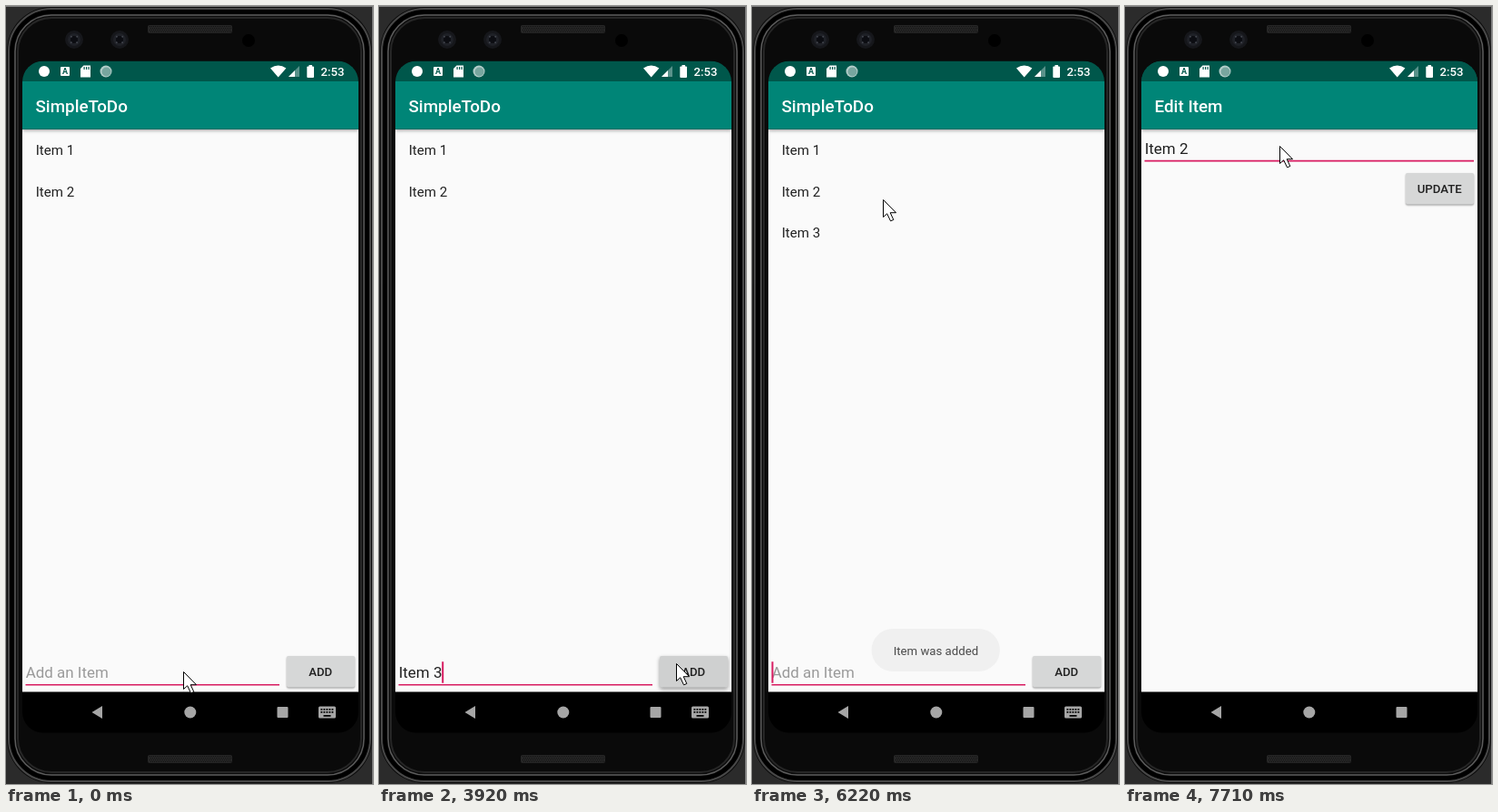
An HTML page with a canvas that plays this animation: 404 by 857 pixels, repeating every 7.99 s.

```html
<!DOCTYPE html>
<html lang="en">
<head>
<meta charset="utf-8">
<title>To-do app on a phone</title>
<style>
  html, body { margin: 0; width: 100%; height: 100%; overflow: hidden; background: #2b2b2b; }
  canvas { display: block; width: 404px; height: 857px; }
</style>
</head>
<body>
<canvas id="stage"></canvas>
<script>
const WIDTH = 404, HEIGHT = 857, LOOP = 7990;
const TEAL = '#008577', DARK_TEAL = '#00574b', PINK = '#d81b60', PAPER = '#fafafa', INK = '#212121';
const SCREEN = { x: 18, top: 60.5, width: 370, bar: 83.1, body: 135.7, nav: 755.4, bottom: 800.7 };

// Motion advances in steps, like a screen recording.
const STEP = 136, PHASE = 78;
const KEYSTROKES = [1040, 1470, 1620, 1920, 2510, 2790];
const ADDED = 4070, OPENED = 6890;
const FOCUS = [600, ...KEYSTROKES, ADDED, 7014];

// Pointer path: step, x, y, with straight moves between
const PATH = [
  [-1, 195, 733], [0, 200, 736], [22.7, 200, 736], [26, 327, 724], [31, 327, 724],
  [32, 350, 725], [34, 219, 676], [37, 114, 478], [44, 144, 213], [49, 144, 213],
  [50, 149, 213], [51, 149, 213], [54, 174, 141], [55, 174, 141], [56, 170, 154]
];

const canvas = document.getElementById('stage');
const ctx = canvas.getContext('2d');
const ratio = window.devicePixelRatio || 1;
canvas.width = WIDTH * ratio;
canvas.height = HEIGHT * ratio;
ctx.scale(ratio, ratio);

const clamp = v => Math.min(1, Math.max(0, v));

function pointerAt(step) {
  const next = PATH.findIndex(key => key[0] > step);
  if (next < 0) return PATH.at(-1).slice(1);
  const [from, x, y] = PATH[next - 1], [to, nextX, nextY] = PATH[next];
  const k = (step - from) / (to - from);
  return [x + (nextX - x) * k, y + (nextY - y) * k];
}

function stateAt(t) {
  const step = Math.floor((t - PHASE) / STEP);
  const s = PHASE + step * STEP;
  const lastFocus = FOCUS.findLast(time => time <= t);
  return {
    value: t < ADDED ? 'Item 3'.slice(0, KEYSTROKES.filter(time => time <= t).length) : '',
    items: t < ADDED ? 2 : 3,
    caret: lastFocus !== undefined && Math.max(0, s - lastFocus + 100) % 1000 < 500,
    ripple: { radius: Math.max(0, (s - 3733) * 0.6), tint: 0.03 * clamp((4290 - s) / 400) },
    toast: Math.min(clamp((s - 4360) / 340), clamp((6470 - s) / 310)),
    edit: clamp((s - 6780) / 246),
    offset: Math.round(9 * Math.exp((7014 - s) / 150)),
    keyboard: t < OPENED,
    pointer: pointerAt(step)
  };
}

function rect(x, y, w, h, fill, radius = 0) {
  ctx.fillStyle = fill;
  ctx.beginPath();
  ctx.roundRect(x, y, w, h, radius);
  ctx.fill();
}

function ring(inset, color, width) {
  ctx.strokeStyle = color;
  ctx.lineWidth = width;
  ctx.beginPath();
  ctx.roundRect(inset, inset, WIDTH - 2 * inset, HEIGHT - 2 * inset, 50 - inset);
  ctx.stroke();
}

function disc(x, y, r, fill) {
  ctx.fillStyle = fill;
  ctx.beginPath();
  ctx.arc(x, y, r, 0, Math.PI * 2);
  ctx.fill();
}

function shape(points, fill, stroke) {
  ctx.beginPath();
  points.forEach(p => ctx.lineTo(...p));
  ctx.closePath();
  ctx.fillStyle = fill;
  ctx.fill();
  if (!stroke) return;
  ctx.strokeStyle = stroke;
  ctx.lineWidth = 1;
  ctx.stroke();
}

function text(string, x, y, size, color = INK, weight = 400, align = 'left') {
  ctx.font = `${weight} ${size}px Roboto, sans-serif`;
  ctx.fillStyle = color;
  ctx.textAlign = align;
  ctx.fillText(string, x, y);
}

function shadowed(blur, dy, draw) {
  ctx.save();
  ctx.shadowColor = 'rgba(0,0,0,.4)';
  ctx.shadowBlur = blur * ratio;
  ctx.shadowOffsetY = dy * ratio;
  draw();
  ctx.restore();
}

function speaker(y) {
  rect(156, y, 93, 9, '#262626', 2);
  for (let row = 0; row < 4; row++)
    for (let x = 158 + row % 2; x < 248; x += 2) rect(x, y + 1 + row * 2, 1, 1, '#111');
}

function camera(x) {
  disc(x, 37, 10, '#16171b');
  disc(x, 37, 7, '#1f2127');
  disc(x, 37, 4, '#0c0d12');
  for (let a = 0.8; a < 6; a += Math.PI / 2)
    disc(x + 4.5 * Math.cos(a), 37 + 4.5 * Math.sin(a), 1, '#42454d');
}

function drawPhone() {
  rect(0, 0, WIDTH, HEIGHT, '#2b2b2b');
  rect(1, 1, WIDTH - 2, HEIGHT - 2, '#0a0a0a', 49);
  ring(3, '#484848', 2);
  ring(6.5, '#000', 4);
  ring(10, '#5c5c5c', 1.5);
  ring(13, '#262626', 2);
  rect(0, 0, WIDTH, 1, '#808080');
  rect(WIDTH - 1, 0, 1, HEIGHT, '#808080');
  speaker(21);
  speaker(825);
  camera(75);
  camera(125);
  disc(267, 38, 7, '#000');
}

function drawStatus() {
  disc(42, 72, 6, '#fff');
  rect(60, 67, 10, 10, '#fff', 1);
  text('A', 65, 75.3, 9, DARK_TEAL, 700, 'center');
  shape([[85.5, 65.5], [93, 65.5], [93, 78.5], [82, 78.5], [82, 69]], '#fff');
  for (let x = 85.5; x < 91; x += 2.5) rect(x, 67, 1.2, 3, DARK_TEAL);
  disc(110, 72, 6.5, '#b3cdc9');
  disc(110.5, 72.5, 5, '#78a69f');

  ctx.fillStyle = '#fff';
  ctx.beginPath();
  ctx.moveTo(299.7, 78.5);
  ctx.lineTo(291, 68.5);
  ctx.quadraticCurveTo(299.7, 62.5, 308.4, 68.5);
  ctx.fill();
  shape([[311, 78], [323, 78], [323, 66]], 'rgba(255,255,255,.35)');
  shape([[311, 78], [318, 78], [318, 71]], '#fff');
  rect(333.5, 65, 3.5, 3, '#fff');
  rect(331.3, 66.5, 7.7, 12.5, '#fff', 1);
  text('2:53', 346.5, 77, 13.2, '#fff', 500);
}

function drawNav(keyboard) {
  const gray = '#a6a6a6';
  shape([[94.5, 778], [106, 771], [106, 785]], gray);
  disc(202.8, 778, 6.5, gray);
  rect(298.5, 772, 12, 12, gray, 1);
  if (!keyboard) return;
  rect(344, 771.5, 19, 13, gray, 1.5);
  for (let y = 774; y < 780; y += 3)
    for (let x = 346.5; x < 361; x += 3) rect(x, y, 1.8, 1.8, '#000');
  rect(349.5, 781, 8, 1.8, '#000');
}

// The areas do not overlap, so the page also fades cleanly.
function drawPage(title) {
  const { x, top, width, bar, body, nav } = SCREEN;
  rect(x, body, width, nav - body, PAPER);
  shadowed(4, 1.5, () => rect(x, bar, width, body - bar, TEAL));
  rect(x, top, width, bar - top, DARK_TEAL);
  text(title, 32.5, 117, 18.84, '#fff', 500);
}

function drawButton(label, y, ripple) {
  const pressed = ripple && ripple.radius * ripple.tint > 0;
  shadowed(pressed ? 4 : 2, pressed ? 2 : 1, () => rect(309, y, 75, 34.5, '#d6d7d7', 2));
  if (pressed) {
    ctx.save();
    ctx.beginPath();
    ctx.roundRect(309, y, 75, 34.5, 2);
    ctx.clip();
    disc(328.5, y + 9.5, ripple.radius, `rgba(0,0,0,${ripple.tint})`);
    ctx.restore();
  }
  text(label, 346.2, y + 22.2, 13.2, INK, 500, 'center');
}

function drawField(value, hint, baseline, right) {
  rect(21.5, baseline + 6.6, right - 21.5, 1.7, PINK);
  text(value || hint, 21.7, baseline, 16.96, value ? INK : '#9a9a9a');
}

function drawCaret(before, baseline) {
  rect(21.5 + ctx.measureText(before).width, baseline - 18, 2, 23.5, PINK);
}

function drawList({ value, items, caret, ripple, toast }) {
  drawPage('SimpleToDo');
  for (let i = 0; i < items; i++) text(`Item ${i + 1}`, 32.7, 164.3 + i * 45.2, 15.07);
  drawField(value, 'Add an Item', 740.3, 301);
  if (caret) drawCaret(value, 740.3);
  drawButton('ADD', 716, ripple);
  ctx.globalAlpha = toast;
  rect(131.5, 686, 141.5, 47, '#efefef', 23.5);
  text('Item was added', 202.4, 715.2, 13.2, '#333', 400, 'center');
  ctx.globalAlpha = 1;
}

function drawEdit({ caret, edit, offset }) {
  ctx.save();
  ctx.globalAlpha = edit;
  ctx.translate(0, offset);
  drawPage('Edit Item');
  drawField('Item 2', '', 163.2, 384);
  if (caret) drawCaret('', 163.2);
  drawButton('UPDATE', 184);
  ctx.restore();
}

function drawPointer(x, y) {
  ctx.save();
  ctx.translate(Math.round(x) + 0.5, Math.round(y) + 0.5);
  shape([[0, 0], [0, 19], [4.2, 15.3], [8, 23.3], [11.3, 22], [7.7, 14.2], [14, 14.2]], '#fff', '#000');
  ctx.restore();
}

function draw(t) {
  const state = stateAt(t);
  const { x, top, width, bottom } = SCREEN;
  drawPhone();
  ctx.save();
  ctx.beginPath();
  ctx.roundRect(x, top, width, bottom - top, 23);
  ctx.clip();
  rect(x, top, width, bottom - top, '#000');
  if (state.edit < 1) drawList(state);
  else rect(x, top, width, 30, DARK_TEAL);
  if (state.edit > 0) drawEdit(state);
  drawStatus();
  drawNav(state.keyboard);
  ctx.restore();
  drawPointer(...state.pointer);
}

const start = performance.now();
function tick() {
  draw((performance.now() - start) % LOOP);
  requestAnimationFrame(tick);
}
tick();
</script>
</body>
</html>
```
